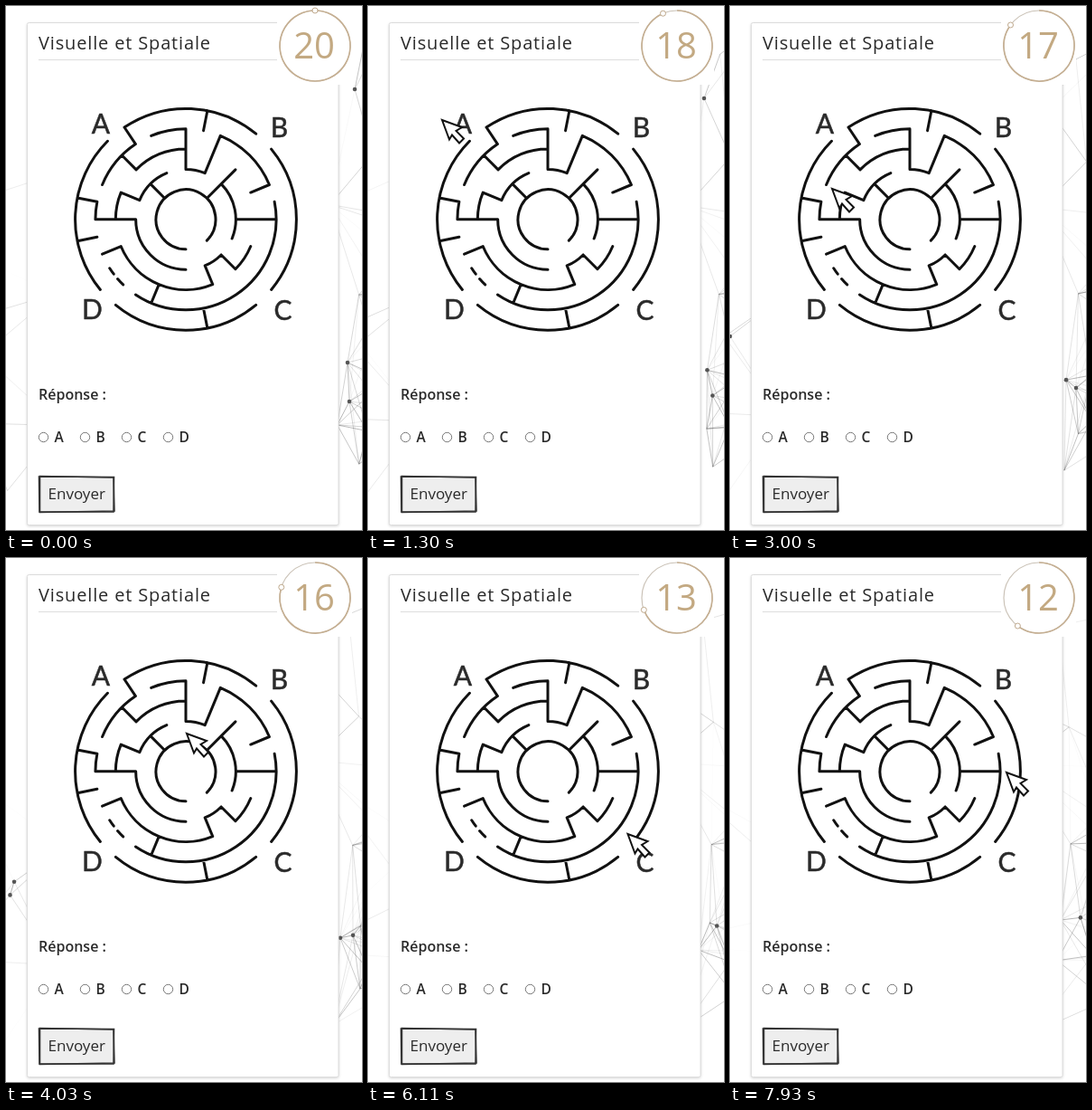
Write an HTML page with a canvas that moves like this. It is 394 px wide and 579 px high and loops after 8000 ms.

```html
<!DOCTYPE html>
<html lang="fr">
<head>
<meta charset="utf-8">
<title>Visuelle et Spatiale</title>
<style>
  html, body { margin: 0; width: 100%; height: 100%; overflow: hidden; background: #fff; }
  canvas, svg { position: absolute; left: 0; top: 0; width: 394px; height: 579px; }
  text { font-family: "Open Sans", "Noto Sans", sans-serif; fill: #2a2a2a; }
  .title { font-size: 20px; letter-spacing: .85px; }
  .label { font-size: 16px; font-weight: 600; }
  .option { font-size: 15.5px; font-weight: 600; }
  .send { font-size: 17px; }
  .count { font-size: 40px; text-anchor: middle; fill: #c3a982; }
  .maze { filter: blur(.5px); }
  .maze path { fill: none; stroke: #111; stroke-width: 3; stroke-linecap: round; stroke-linejoin: round; }
  .maze text { font: 30px Lato, "Open Sans", sans-serif; text-anchor: middle; stroke: #2a2a2a; stroke-width: .5; }
  .card { fill: #fff; stroke: #dcdcdc; filter: drop-shadow(0 1px 1.5px rgba(0,0,0,.16)); }
  .sketch { stroke: #333; stroke-width: 1.6; }
</style>
</head>
<body>
<canvas id="net" width="394" height="579"></canvas>
<svg viewBox="0 0 394 579">
  <rect class="card" x="23.5" y="18.5" width="344.5" height="555" rx="2"/>
  <rect x="300" y="0" width="83" height="87" fill="#fff"/>
  <text class="title" x="36" y="47.5">Visuelle et Spatiale</text>
  <path d="M36 59.5H300" stroke="#ddd"/>

  <g class="maze">
    <path id="walls"/>
    <text x="105" y="140.5">A</text>
    <text x="302.5" y="144.5">B</text>
    <text x="306.5" y="347">C</text>
    <text x="95.5" y="346">D</text>
  </g>

  <text class="label" x="36" y="435">Réponse :</text>
  <g id="options"></g>

  <path class="sketch" d="M36.5 520L119.5 520.5L119 559L37 559Z" fill="#eee"/>
  <path class="sketch" d="M37.5 519.5L119 521L120 558L37.5 559.5Z" fill="none"/>
  <text class="send" x="46.5" y="545">Envoyer</text>

  <circle cx="342" cy="44" r="39" fill="#fff" stroke="#cbc3b8" stroke-width="1.2"/>
  <path id="left" fill="none" stroke="#c5af92" stroke-width="1.6"/>
  <circle id="bead" r="3" fill="#fff" stroke="#bfa98d"/>
  <text id="count" class="count" x="341" y="58"></text>

  <path id="cursor" d="M0 0L22 8L15.5 12L24 20.5L19 25.5L11 16.5L8 21.5Z"
        fill="#fff" stroke="#111" stroke-width="2"/>
</svg>
<script>
const LOOP = 8000, STEP = 130;
const byId = id => document.getElementById(id);

function polar(cx, cy, r, deg) {
  const a = deg * Math.PI / 180;
  return [cx + r * Math.cos(a), cy + r * Math.sin(a)].map(v => v.toFixed(2));
}

// The maze is a polar grid: 5 even rings, 32 sectors clockwise from the right.
// A walk starts at ring/sector; "i" and "o" step in and out, numbers follow the ring.
function wall(walk) {
  const [from, ...moves] = walk.split(" ");
  let [ring, sector] = from.split("/").map(Number);
  const radius = () => 33 + 22.35 * ring;
  const point = () => polar(199, 235.8, radius(), sector * 11.25);
  let d = `M${point()}`;
  for (const move of moves) {
    if (/[io]/.test(move)) {
      ring += move[0] === "o" ? move.length : -move.length;
      d += `L${point()}`;
    } else {
      const n = Number(move), r = radius();
      sector += n;
      d += `A${r} ${r} 0 ${+(Math.abs(n) > 16)} ${+(n > 0)} ${point()}`;
    }
  }
  return d;
}

const gates = [4, 12, 20.5, 28, 36];
const rim = gates.slice(1).map((g, i) => `4/${gates[i] + .5} ${g - gates[i] - 1}`);
const walks = [
  "4/21 i -3", "3/20 i 4", "3/22 2 ii 2 oo 4 i", "2/28 ii", "1/28 6", "3/31 12", "3/32 ii",
  "4/25 i", "4/39 i", "4/47 i", "4/49 i -1 ii -8", "2/16 2 i 4", "1/20 i", "0/8 28",
  "2/2 2 i 2 o 8 o", "3/10 i", "3/11.9 .45", "3/12.7 .4"
];
byId("walls").setAttribute("d", [...rim, ...walks].map(wall).join(""));

byId("options").innerHTML = [..."ABCD"].map((c, i) => {
  const x = 41.5 + i * 46;
  return `<circle cx="${x}" cy="476.5" r="5.2" fill="#fff" stroke="#777"/>
    <text class="option" x="${x + 12}" y="482">${c}</text>`;
}).join("");

// Net: a few hubs with dots, then seeded nodes on both sides of the card.
const hub = (x, y, vx, vy) => ({ x, y, vx, vy, dot: true });
const nodes = [hub(378, 394, -2, 6.4), hub(380, 437, 1, -5), hub(386, 92, -10.8, 7.7),
               hub(-26, 386, 8.7, -7), hub(-37, 345, 10.3, 6.8)];
let seed = 11;
const rand = () => (seed = seed * 16807 % 2147483647) / 2147483647;
const speed = () => (rand() - .5) * 14;
for (let i = 0; i < 24; i++) {
  const x = i % 3 ? 345 + rand() * 130 : -70 + rand() * 130;
  nodes.push({ x, y: rand() * 579, vx: speed(), vy: speed() });
}

const ctx = byId("net").getContext("2d");
function drawNet(sec) {
  const reach = 140;
  const pts = nodes.map(n => ({ x: n.x + n.vx * sec, y: n.y + n.vy * sec, dot: n.dot }));
  ctx.clearRect(0, 0, 394, 579);
  ctx.lineWidth = .8;
  pts.forEach((p, i) => {
    for (const q of pts.slice(i + 1)) {
      const d = Math.hypot(p.x - q.x, p.y - q.y);
      if (d > reach) continue;
      ctx.strokeStyle = `rgba(70,70,70,${.6 * (1 - d / reach)})`;
      ctx.beginPath();
      ctx.moveTo(p.x, p.y);
      ctx.lineTo(q.x, q.y);
      ctx.stroke();
    }
    if (!p.dot) return;
    ctx.fillStyle = "#555";
    ctx.beginPath();
    ctx.arc(p.x, p.y, 2.3, 0, 7);
    ctx.fill();
  });
}

// Pointer stops: seconds, x, y.
const stops = [
  [.8, 70, 150], [1.3, 82, 126], [3, 113, 202], [4.03, 200, 194],
  [5.2, 295, 210], [7.02, 280, 400], [7.93, 306, 237]
];
const cursor = byId("cursor");
function moveCursor(sec) {
  cursor.style.display = sec < stops[0][0] ? "none" : "";
  const i = Math.max(1, stops.findIndex((s, k) => s[0] > sec || k === stops.length - 1));
  const [t0, x0, y0] = stops[i - 1], [t1, x1, y1] = stops[i];
  const k = Math.max(0, Math.min(1, (sec - t0) / (t1 - t0)));
  const e = k * k * (3 - 2 * k);
  cursor.setAttribute("transform", `translate(${x0 + (x1 - x0) * e} ${y0 + (y1 - y0) * e})`);
}

// One turn takes 20 seconds.
function drawTimer(sec) {
  const turn = 18 * sec;
  const [x, y] = polar(342, 44, 39, -90 - turn);
  const [sx, sy] = polar(342, 44, 39, -89.9);
  byId("bead").setAttribute("cx", x);
  byId("bead").setAttribute("cy", y);
  byId("left").setAttribute("d", `M${sx} ${sy}A39 39 0 ${+(turn < 180)} 1 ${x} ${y}`);
  byId("count").textContent = Math.floor(20 - Math.max(0, sec - .06));
}

const start = performance.now();
function frame(now) {
  const t = Math.floor((Math.max(0, now - start) % LOOP) / STEP) * STEP / 1000;
  drawNet(t);
  drawTimer(t);
  moveCursor(t);
  requestAnimationFrame(frame);
}
frame(start);
</script>
</body>
</html>
```
